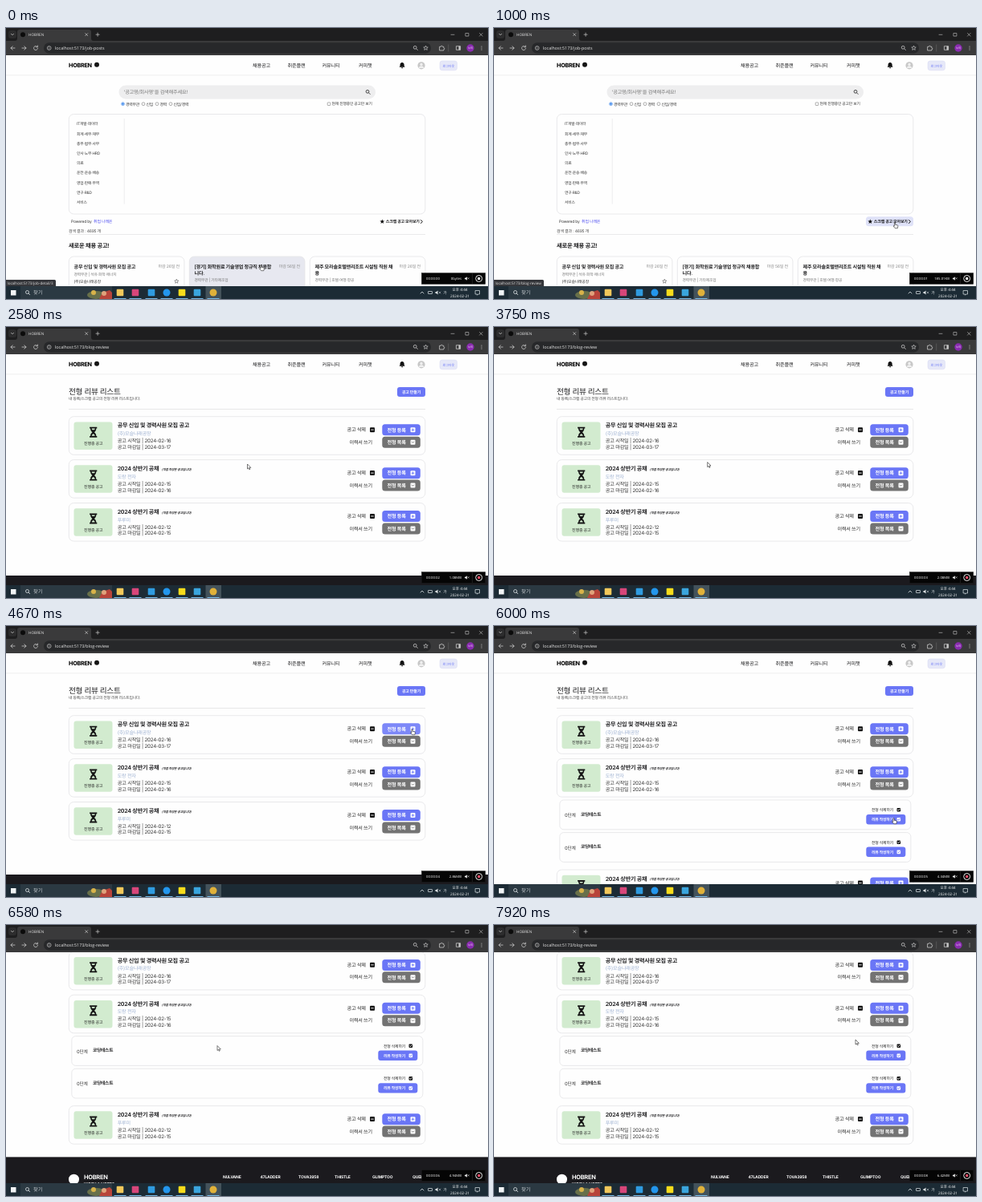
An HTML page for the animation above (8 s loop, 600 by 338 pixels).

```html
<!DOCTYPE html>
<html>
<head>
<meta charset="utf-8">
<title>Job board</title>
<style>
html, body { margin: 0; width: 100%; height: 100%; overflow: hidden; background: #fefefe; }
svg { display: block; width: 100%; height: 100%; }
text { font-family: Inter, "Noto Sans CJK KR", "Noto Sans CJK", sans-serif; letter-spacing: -.035em; text-rendering: geometricPrecision; white-space: pre; }
text.ui { font-family: "Open Sans", "Noto Sans CJK KR", "Noto Sans CJK", sans-serif; letter-spacing: 0; }
</style>
</head>
<body>
<svg id="stage" viewBox="0 0 600 338">
  <defs><clipPath id="view"><rect y="34" width="600" height="288"/></clipPath></defs>
</svg>
<script>
const BLUE = '#6a76f6', INK = '#1c1c1e', EDGE = '#e4e4e6';

// cy is the vertical middle of the line
const text = (x, cy, size, str, fill = INK, weight = 400, more = '') =>
  `<text x="${x}" y="${cy + size * .37}" font-size="${size}" fill="${fill}" font-weight="${weight}" ${more}>${str}</text>`;
const mid = 'text-anchor="middle"', end = 'text-anchor="end"', ui = 'class="ui"';
const rect = (x, y, w, h, fill, r = 0, more = '') =>
  `<rect x="${x}" y="${y}" width="${w}" height="${h}" rx="${r}" fill="${fill}" ${more}/>`;
const box = (x, y, w, h, r = 6, more = '') => rect(x, y, w, h, '#fefefe', r, `stroke="${EDGE}" stroke-width=".8" ${more}`);
const dot = (x, y, r, fill, more = '') => `<circle cx="${x}" cy="${y}" r="${r}" fill="${fill}" ${more}/>`;
const line = (d, color, w = .8) =>
  `<path d="${d}" fill="none" stroke="${color}" stroke-width="${w}" stroke-linecap="round" stroke-linejoin="round"/>`;
const shape = (d, fill, more = '') => `<path d="${d}" fill="${fill}" ${more}/>`;
const at = (x, y, inner, id = '') => `<g ${id && `id="${id}"`} transform="translate(${x} ${y})">${inner}</g>`;
const star = (x, y, r, fill, more = '') => {
  const pts = Array.from({ length: 10 }, (_, i) => {
    const a = i * Math.PI / 5 - Math.PI / 2, k = i % 2 ? r * .45 : r;
    return `${(x + k * Math.cos(a)).toFixed(2)},${(y + k * Math.sin(a)).toFixed(2)}`;
  });
  return `<polygon points="${pts.join(' ')}" fill="${fill}" ${more}/>`;
};
const lens = (x, y, color, r = 1.9) =>
  dot(x - .5, y - .5, r, 'none', `stroke="${color}" stroke-width=".8"`) + line(`M${x + 1} ${y + 1}l1.7 1.7`, color);

const glyphs = { minus: 'M-1.4 0h2.8', plus: 'M-1.4 0h2.8M0 -1.4v2.8', down: 'M-1.3 -.6l1.3 1.3 1.3 -1.3', check: 'M-1.2 0l.9 .9 1.6 -1.8' };
const badge = (x, y, s, fill, ink, glyph) =>
  at(x, y, rect(-s / 2, -s / 2, s, s, fill, 1) + line(glyphs[glyph], ink, .9));

function siteHeader() {
  const nav = [[307, '채용공고'], [350.5, '취준플랜'], [393.5, '커뮤니티'], [439, '커피챗']];
  return text(78, 46, 7.2, 'HOBREN', '#111', 800) + dot(113, 45.7, 3, '#151515') +
    nav.map(([x, s]) => text(x, 46.8, 6.2, s)).join('') +
    shape('M489.6 48.8c1-.9.9-2 1-3.2.1-1.6 1.1-2.4 2.4-2.6 1.500.2 2.500 1 2.600 2.600.1 1.200 0 2.300 1 3.200zM492 49.300h2.200a1.100 1.100 0 0 1-2.200 0z', '#111') +
    dot(517, 46.8, 4.6, '#c8c8c8') + dot(517, 45.4, 1.7, '#f0f0f0') + shape('M514 50a3 2.700 0 0 1 6 0z', '#f0f0f0') +
    rect(540, 41, 21.5, 11.8, '#e6e8f8', 3, 'stroke="#d6d9f2" stroke-width=".5"') + text(550.8, 47, 4.1, '로그아웃', BLUE, 500, mid) +
    rect(0, 58.600, 600, .7, '#e6e6e6');
}

function postsPage() {
  const radios = [[145.500, '경력무관'], [171, '신입'], [188, '경력'], [205, '신입/경력']];
  const fields = ['IT개발·데이터', '회계·세무·재무', '총무·법무·사무', '인사·노무·HRD', '의료', '운전·운송·배송', '영업·판매·무역', '연구·R&amp;D', '서비스'];
  const cards = [
    [78, ['공무 신입 및 경력사원 모집 공고'], '26', '석유·화학·에너지'],
    [228, ['[경기] 화학원료 기술영업 정규직 채용합', '니다.'], '56', '기타제조업'],
    [378, ['제주 모라솔호텔앤리조트 시설팀 직원 채', '용'], '26', '호텔·여행·항공'],
  ];
  const card = ([x, title, days, field], i) =>
    box(x + .3, 285, 143.600, 60, 6, `id="post${i}"`) +
    title.map((s, n) => text(x + 6.500, 298 + n * 8, 6.1, s, INK, 600)).join('') +
    text(x + 138, 297, 5.1, `마감 ${days}일 전`, '#8a8a8a', 400, end) +
    text(x + 6.500, 299.500 + title.length * 7.600, 4.8, `경력무관 | ${field}`, '#777');
  return rect(140.500, 71.500, 319.500, 17, '#eeeeef', 8.500) +
    text(146.500, 80, 6.2, "'공고명/회사명'을 검색해주세요!", '#777') + lens(450.500, 79.800, '#222') +
    radios.map(([x, s], i) => dot(x, 94.700, 1.900, '#fff', `stroke="${i ? '#777' : '#1a73e8'}" stroke-width=".6"`) +
      (i ? '' : dot(x, 94.700, 1.100, '#1a73e8')) + text(x + 3.400, 94.700, 4.9, s, '#333')).join('') +
    rect(400.200, 92.900, 3.600, 3.600, '#fff', .6, 'stroke="#777" stroke-width=".6"') + text(405.500, 94.700, 4.8, '현재 진행중인 공고만 보기', '#333') +
    box(78.300, 107.500, 443.500, 124.500) + rect(146.800, 113, .7, 106.500, EDGE) +
    fields.map((s, i) => text(88, 119.700 + i * 12.200, 4.8, s, '#333')).join('') +
    text(81, 241.500, 4.9, 'Powered by', '#333') + text(109, 241.500, 5, '취업 나래온', '#4a4af0', 500) +
    rect(463, 235.300, 59, 12, '#dfe2f8', 3.500, 'id="scrap"') + star(468.300, 241.500, 3, '#111') +
    text(472.800, 241.500, 5, '스크랩 공고 모아보기', INK, 600) + line('M516.400 239.500l2 2-2 2', '#111', 1) +
    text(78, 253.600, 5, '검색 결과 : 4695 개', '#444') + rect(78, 257.200, 444, .6, '#dedee0') +
    text(78, 271, 7.3, '새로운 채용 공고!', INK, 600) + cards.map(card).join('') +
    text(84.500, 315.800, 4.9, '(주)모슬나래공장', '#333') + star(212.300, 316, 2.700, 'none', 'stroke="#555" stroke-width=".6"');
}

const hourglass = shape('M-4.600-6.500h9.200v1.700h-1c0 2.600-1.200 3.600-2.300 4.800 1.100 1.200 2.300 2.200 2.300 4.800h1v1.700h-9.200v-1.700h1c0-2.600 1.200-3.600 2.300-4.800-1.100-1.200-2.300-2.200-2.300-4.800h-1z', '#151515') +
  shape('M-2.100-4.600h4.200l-.6 1.700h-3zM-2 4.600c.2-1.500 1-2.100 2-2.600 1 .5 1.800 1.100 2 2.600z', '#d2ebcf');

function reviewCard(title, company, start, close, manual, first) {
  const action = (y, label, fill, glyph, id) =>
    rect(468.300, y, 47.500, 14, fill, 3.500, id) + text(474.500, y + 7, 6.2, label, '#fff', 600) + badge(506.500, y + 7, 6, '#fff', fill, glyph);
  return box(78.300, 0, 443.500, 47.600) + rect(84.500, 6.700, 48, 34.500, '#d2ebcf', 3) + at(108.700, 19.500, hourglass) +
    text(108.700, 33.500, 5, '진행중 공고', '#222', 500, mid) + text(138.700, 11, 7.1, title, INK, 600) +
    (manual ? text(194, 12, 3.7, '(직접 작성한 공고입니다)', INK, 600, 'font-style="italic"') : '') +
    text(138.700, 20.800, 6.1, company, '#9fb2d2') +
    text(138.700, 30, 6.2, `공고 시작일 | ${start}`, '#333') + text(138.700, 37.700, 6.2, `공고 마감일 | ${close}`, '#333') +
    text(424.500, 16.500, 6.2, '공고 삭제', '#222', 500) + badge(456, 16.500, 6, '#111', '#fff', 'minus') +
    text(427.500, 31.800, 6.1, '이력서 쓰기', '#222', 500) +
    action(9.600, '전형 등록', BLUE, 'plus', first ? 'id="register"' : '') + action(25, '전형 목록', '#737373', 'down');
}

const stageCard = box(81.800, 0, 437, 36.800, 5) + text(88, 18.800, 5.8, '0단계', '#333') + text(108, 17.500, 5.7, '코딩테스트', INK, 600) +
  text(470, 12.200, 4.9, '전형 삭제하기', '#222', 500) + badge(503.800, 12.200, 4.600, '#111', '#fff', 'check') +
  rect(463.300, 18, 49, 12.400, BLUE, 3) + text(470, 24.300, 4.9, '리뷰 작성하기', '#fff', 600) + badge(503.800, 24.300, 4.600, '#fff', BLUE, 'check');

function reviewPage() {
  const members = [[270, 'NULVANE'], [316.500, '47LADDER'], [364, 'TOVA3958'], [409, 'THISTLE'], [456, 'GLIMPTOO'], [506, 'QUELDRA']];
  const footer = rect(0, 0, 600, 90, '#1b1a1e') + dot(84.500, 27.800, 6.500, '#fff') + text(97, 25, 7.4, 'HOBREN', '#fff', 700) +
    text(97, 34, 5.2, 'WORK &amp; NOTES', '#fff', 700) + members.map(([x, s]) => text(x, 24.800, 5, s, '#fff', 700)).join('');
  return text(78, 80.500, 9.7, '전형 리뷰 리스트', INK, 500) + text(78, 89.600, 4.8, '내 등록/스크랩 공고의 전형 리뷰 리스트입니다.', '#444') +
    rect(487, 75, 35, 12, BLUE, 3) + text(504.500, 81, 5, '공고 만들기', '#fff', 600, mid) + rect(78, 102.200, 444, .7, '#dedee0') +
    at(0, 111.700, reviewCard('공무 신입 및 경력사원 모집 공고', '(주)모슬나래공장', '2024-02-16', '2024-03-17', false, true)) +
    at(0, 165.600, reviewCard('2024 상반기 공채', '도랑 전자', '2024-02-15', '2024-02-16', true)) +
    `<g id="stages">${at(0, 217, stageCard)}${at(0, 257.600, stageCard)}</g>` +
    at(0, 219.500, reviewCard('2024 상반기 공채', '푸루미', '2024-02-12', '2024-02-15', true), 'lastCard') + at(0, 310, footer, 'footer');
}

function browserBar() {
  const c = '#c8c8c8';
  return rect(0, 0, 600, 17, '#1e1e1f') + rect(0, 16, 600, 18, '#3a3a3b') + shape('M11 16q3 0 3-3V5q0-3 3-3h86q3 0 3 3v8q0 3 3 3z', '#3a3a3b') +
    rect(3, 3, 10, 10, '#2d2d2e', 3) + line('M6.500 7.300l1.500 1.500 1.500-1.500', c) + dot(21, 8.300, 3, '#0b0b0b') +
    text(28, 8.300, 4.7, 'HOBREN', '#e4e4e4', 400, ui) + line('M98.700 6.700l3 3m0-3l-3 3M112 8.200h4.200m-2.100-2.100v4.200', c, .7) +
    line('M554 8.300h4M589.500 6.500l3.600 3.600m0-3.600l-3.600 3.600M572.300 6.500h3.600v3.600h-3.600z', c, .6) +
    line('M11 25H6m2.200-2.200L6 25l2.200 2.200M20 25h5m-2.200-2.200L25 25l-2.200 2.200', c) +
    line('M39 23.500a2.500 2.500 0 1 0 .5 2M39.400 22v1.800h-1.800', c) +
    rect(47, 18.300, 482, 13.400, '#27282a', 6.700) + dot(53.700, 25, 2.400, 'none', `stroke="${c}" stroke-width=".7"`) + line('M53.700 24.800v1.300M53.700 23.700v.1', c, .6) +
    text(61, 25, 5.4, '', '#e8e8e8', 400, ui + ' id="url"') + lens(509.700, 24.800, c) + star(522.500, 25, 2.900, 'none', `stroke="${c}" stroke-width=".7"`) +
    line('M540 23.300h1.400a1 1 0 0 1 2 0h1.400v1.500a1 1 0 0 1 0 2v1.200H540z', c) + rect(550.500, 20.500, .6, 9, '#666') +
    line('M560.800 22.700h4.800v4.600h-4.800z', c) + rect(563.500, 22.700, 2.200, 4.600, c) +
    dot(578, 25, 4.700, '#8a2bb0') + text(578, 25, 3.4, '누리', '#fff', 400, mid) +
    [23, 25, 27].map(y => dot(592, y, .6, c)).join('');
}

function taskbar() {
  const c = '#dfe5e8';
  const apps = [[142, '#f2c85b'], [161, '#d8467a'], [181, '#2f9be0'], [200, '#2396ed', 1], [219, '#f7dc1b'], [238, '#3aa5dd'], [258, '#e0b13a', 1]];
  return rect(0, 322, 600, 16, '#1c2b35') + rect(6, 327, 6.500, 6.500, '#f0f4f6') + rect(18, 322, 114, 16, '#2b3942') + lens(27, 330, c, 2) +
    text(34, 330, 6.2, '찾기', '#c8ced2', 400, ui) +
    `<ellipse cx="112" cy="333" rx="11" ry="5" fill="#68704a"/>` + dot(109, 330, 3, '#d8b34a') + shape('M116 338l4-8 9-3 3 3v8z', '#b8443a') + dot(122, 331, 3, '#e0a27c') +
    rect(248.500, 322, 19.500, 16, '#43525b') +
    apps.map(([x, fill, round]) => (round ? dot(x, 330, 4.500, fill) : rect(x - 4.300, 325.700, 8.600, 8.600, fill, 1)) + rect(x - 7.500, 337, 15, 1, '#76b9e6')).join('') +
    line('M516 331l2-2 2 2', c) + rect(525.500, 328.500, 5, 3, 'none', .3, `stroke="${c}" stroke-width=".7"`) +
    shape('M534.500 329h1.300l1.700-1.500v5l-1.700-1.500h-1.300z', c) + line('M539 329l2 2m0-2l-2 2', c, .5) + text(546.500, 330, 5, '가', c, 400, mid + ' ' + ui) +
    text(565, 326.200, 4.7, '오후 4:44', '#fff', 400, mid + ' ' + ui) + text(565, 333.800, 4.6, '2024-02-21', '#fff', 400, mid + ' ' + ui) +
    line('M584.500 327.500h5v4.500h-2l-1 1.200v-1.200h-2z', c, .7);
}

const recorder = rect(517.300, 305.500, 79.500, 14, '#050505', 0, 'stroke="#222" stroke-width=".4"') +
  text(523, 312.500, 4.3, '', '#fff', 400, ui + ' id="clock"') + text(567, 312.500, 4.3, '', '#fff', 400, end + ' ' + ui + ' id="size"') +
  shape('M571 311.700h1.200l1.600-1.400v4.400l-1.600-1.400h-1.200z', '#fff') + line('M574.800 311.600l1.500 1.500m0-1.500l-1.500 1.500', '#fff', .5) +
  rect(580.500, 306, .5, 13, '#333') + dot(588.700, 312.500, 4, 'none', 'stroke="#fff" stroke-width=".9"') + rect(587.200, 311, 3, 3, '#fff', .5, 'id="rec"');

const cursor = `<g id="cursor" stroke="#222" stroke-width=".6" stroke-linejoin="round">` +
  shape('M0 0V6L1.400 4.800 2.300 6.800 3.300 6.400 2.400 4.400H4.300Z', '#fff', 'id="arrow"') +
  shape('M-.6 0q.6-.7 1.200 0v2.300l2.700.6q.7.2.6 1l-.5 2.800h-3.200l-2.200-2.700q.4-.8 1.400.1z', '#fff', 'id="hand"') + '</g>';

document.getElementById('stage').insertAdjacentHTML('beforeend',
  rect(0, 0, 600, 338, '#fefefe') +
  `<g clip-path="url(#view)"><g id="scroller">${siteHeader()}<g id="posts">${postsPage()}</g><g id="reviews">${reviewPage()}</g></g></g>` +
  `<g id="status">${rect(-2, 314, 64, 9, '#35363a', 1.500)}${text(1.500, 318.200, 4.6, '', '#e0e0e0', 400, ui + ' id="link"')}</g>` +
  browserBar() + taskbar() + recorder + cursor);

const $ = Object.fromEntries([...document.querySelectorAll('[id]')].map(e => [e.id, e]));
const LOOP = 8000, PAGE_SWAP = 1400, OPEN = 5330;
const path = [[0, 317.500, 296], [150, 317.500, 296], [800, 499, 243], [1600, 499, 243], [2350, 300.500, 171], [2650, 300.500, 171], [3100, 180, 140],
  [3500, 190, 180], [4100, 390, 150], [4550, 505.500, 129], [4800, 505.500, 129], [5130, 507, 195], [5450, 507, 195], [5850, 497.500, 240],
  [6080, 497.500, 240], [6450, 263, 150.500], [6650, 263, 150.500], [7050, 200, 165], [7800, 450, 143], [8000, 450, 143]];
const sizes = [[0, 0], [300, 0], [1000, .1801], [2580, 1.08], [4670, 2.86], [6000, 4.34], [6580, 4.94], [7920, 6.42], [8000, 6.5]];
const scrolls = [[0, 0], [6130, 0], [6450, 78.400], [8000, 78.400]];
const seconds = [950, 2000, 3000, 4000, 5050, 6080, 7000, 7900];

const smooth = u => u * u * (3 - 2 * u);
function sample(steps, t, ease = u => u) {
  const i = Math.max(1, steps.findIndex(s => s[0] > t));
  const [a, b] = [steps[i - 1], steps[i]];
  const u = ease((t - a[0]) / (b[0] - a[0]));
  return a.slice(1).map((v, k) => v + (b[k + 1] - v) * u);
}
const show = (el, on) => el.setAttribute('visibility', on ? 'visible' : 'hidden');
const move = (el, x, y) => el.setAttribute('transform', `translate(${x} ${y})`);
const inside = (x, y, l, t, r, b) => x >= l && x <= r && y >= t && y <= b;

function draw(t) {
  const [x, y] = sample(path, t, smooth), [scroll] = sample(scrolls, t, smooth), [mb] = sample(sizes, t);
  const onPosts = t < PAGE_SWAP, open = t >= OPEN;
  const post = onPosts && y > 285 ? [78, 228, 378].findIndex(l => x >= l && x <= l + 144) : -1;
  const scrap = onPosts && inside(x, y, 463, 235, 522, 247.500);
  const py = y + scroll;
  const register = !onPosts && inside(x, py, 468, 121, 516, 135);
  const button = register || !onPosts && (inside(x, py, 468, 136.500, 516, 151) || inside(x, py, 468, 175, 516, 205) ||
    open && inside(x, py, 463, 235, 512, 247.500));

  $.posts.style.display = onPosts ? '' : 'none';
  $.reviews.style.display = onPosts ? 'none' : '';
  $.stages.style.display = open ? '' : 'none';
  move($.lastCard, 0, open ? 304 : 219.500);
  move($.footer, 0, open ? 367.800 : 310);
  move($.scroller, 0, -scroll);
  for (let i = 0; i < 3; i++) $['post' + i].setAttribute('fill', i === post ? '#e7e8f0' : '#fefefe');
  $.scrap.setAttribute('opacity', scrap ? 1 : 0);
  $.register.setAttribute('fill', register ? '#7d88f8' : BLUE);

  $.status.style.display = scrap || post >= 0 ? '' : 'none';
  $.link.textContent = 'localhost:5173/' + (scrap ? 'blog-review' : 'job-detail/' + (post + 2));
  $.url.textContent = 'localhost:5173/' + (onPosts ? 'job-posts' : 'blog-review');
  $.clock.textContent = '00:00:0' + seconds.filter(s => s <= t).length;
  $.size.textContent = !mb ? '0bytes' : mb < 1 ? (mb * 1024).toFixed(2) + 'KB' : mb.toFixed(2) + 'MB';
  $.rec.setAttribute('fill', onPosts ? '#fff' : '#f0506a');

  const hand = scrap || post >= 0 || button;
  show($.hand, hand);
  show($.arrow, !hand);
  move($.cursor, x, y);
}

const began = performance.now();
function tick() {
  draw((performance.now() - began) % LOOP);
  requestAnimationFrame(tick);
}
tick();
</script>
</body>
</html>
```
